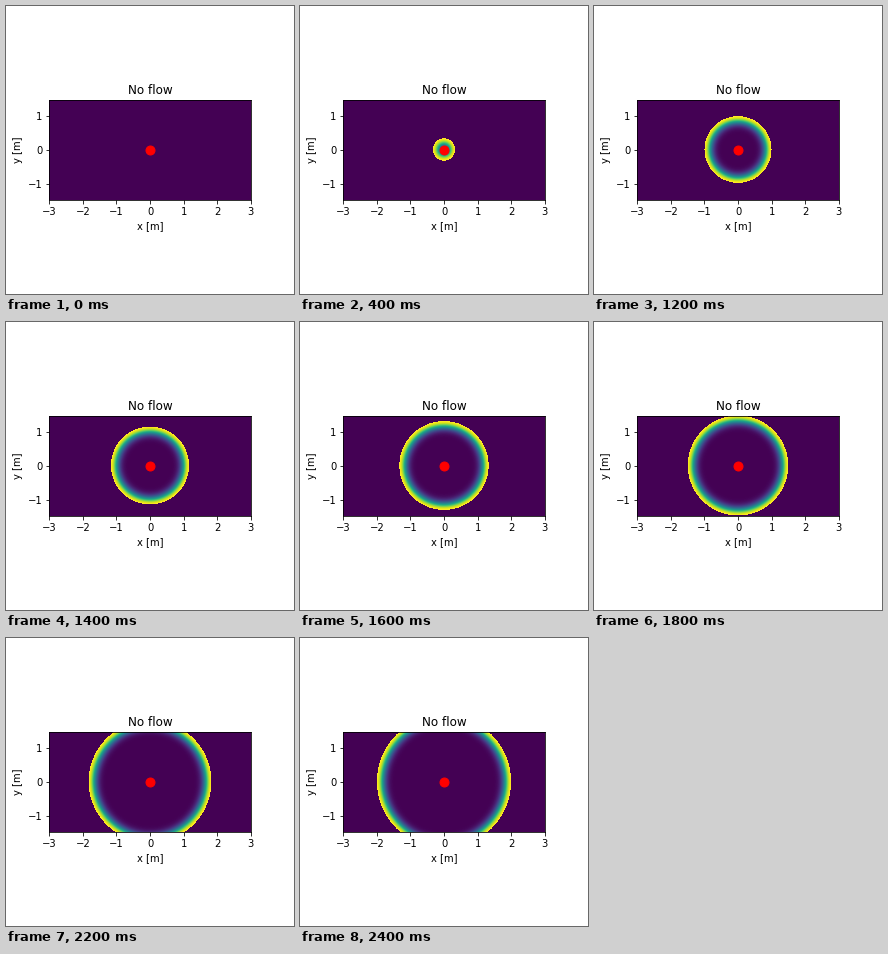
Recreate the animation shown at these times as a matplotlib script. Size 288x288 px, loop 2500 ms.

```python
import numpy as np
import matplotlib.pyplot as plt
from matplotlib.animation import FuncAnimation

FRAMES, STEP_MS = 25, 100
FRONT_SPEED = 2 / 24   # metres per frame
WIDTH = 0.155          # length of the tail behind the front

x, y = np.meshgrid(np.linspace(-3, 3, 202), np.linspace(-1.5, 1.5, 101))
dist = np.hypot(x, y)


def pulse(i):
    lag = i * FRONT_SPEED - dist
    return np.where(lag >= 0, np.exp(-lag**2 / (2 * WIDTH**2)), 0)


fig, ax = plt.subplots(figsize=(4, 4), dpi=72)
fig.subplots_adjust(left=0.15, right=0.85, bottom=0.15, top=0.85)
field = ax.imshow(pulse(0), extent=(-3, 3, -1.5, 1.5), origin="lower",
                  vmin=0, vmax=1, cmap="viridis", interpolation="nearest")
ax.plot(0, 0, "o", color="red", markersize=9)
ax.set_title("No flow")
ax.set_xlabel("x [m]")
ax.set_ylabel("y [m]")
ax.set_xticks(range(-3, 4))
ax.set_yticks([-1, 0, 1])


def update(i):
    field.set_data(pulse(i))
    return [field]


anim = FuncAnimation(fig, update, frames=FRAMES, interval=STEP_MS,
                     repeat=True, repeat_delay=0)
plt.show()
```
